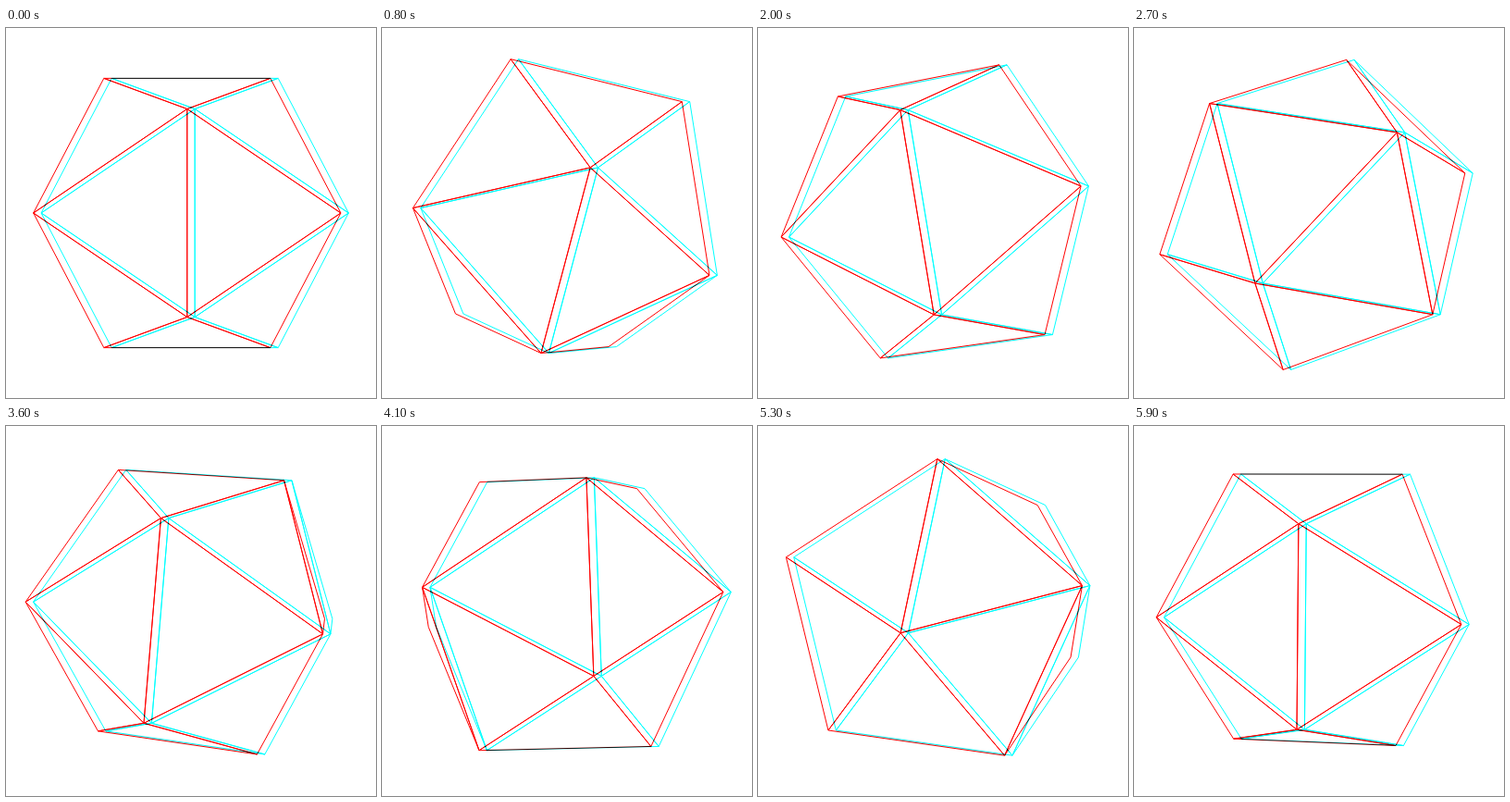
Write an HTML page with a canvas that moves like this. It is 400x400 px and loops after 6000 ms.

```html
<!DOCTYPE html>
<html lang="en">
<head>
<meta charset="utf-8">
<title>Anaglyph icosahedron</title>
<style>
  html, body { margin: 0; width: 100%; height: 100%; overflow: hidden; background: #fff; }
  canvas { display: block; }
</style>
</head>
<body>
<canvas id="stage" width="400" height="400"></canvas>
<script>
const ctx = document.getElementById('stage').getContext('2d');
const PHI = (1 + Math.sqrt(5)) / 2;
const UNIT = 90;            // pixels per unit at depth 0
const DISTANCE = 5 * PHI;   // from eye to centre
const PARALLAX = 4.2;
const LOOP = 6000, STEP = 100;

const dot = (a, b) => a[0] * b[0] + a[1] * b[1] + a[2] * b[2];
const cross = (a, b) => [
  a[1] * b[2] - a[2] * b[1],
  a[2] * b[0] - a[0] * b[2],
  a[0] * b[1] - a[1] * b[0]
];

const vertices = [];
for (const s of [-1, 1]) {
  for (const p of [-PHI, PHI]) vertices.push([0, s, p], [s, p, 0], [p, 0, s]);
}

// Faces are triples of neighbours, wound counter-clockwise seen from outside.
const adjacent = (i, j) => Math.abs(dot(vertices[i], vertices[j]) - PHI) < 1e-6;
const faces = [];
for (let i = 0; i < 12; i++) {
  for (let j = i + 1; j < 12; j++) {
    for (let k = j + 1; k < 12; k++) {
      if (!adjacent(i, j) || !adjacent(j, k) || !adjacent(i, k)) continue;
      const outward = dot(vertices[i], cross(vertices[j], vertices[k])) > 0;
      faces.push(outward ? [i, j, k] : [i, k, j]);
    }
  }
}

function pitch([x, y, z], angle) {
  const c = Math.cos(angle), s = Math.sin(angle);
  return [x, y * c + z * s, z * c - y * s];
}

function yaw([x, y, z], angle) {
  const c = Math.cos(angle), s = Math.sin(angle);
  return [x * c + z * s, y, z * c - x * s];
}

function project([x, y, z]) {
  const scale = UNIT * DISTANCE / (DISTANCE - z);
  return [200 + x * scale, 200 - y * scale];
}

const facesViewer = ([a, b, c]) =>
  (b[0] - a[0]) * (c[1] - a[1]) - (b[1] - a[1]) * (c[0] - a[0]) < 0;

function drawEye(triangles, color, shift) {
  ctx.strokeStyle = color;
  for (const triangle of triangles) {
    ctx.beginPath();
    for (const [x, y] of triangle) ctx.lineTo(x + shift, y);
    ctx.closePath();
    ctx.stroke();
  }
}

function draw() {
  const time = Math.floor(performance.now() % LOOP / STEP) * STEP;
  const angle = 2 * Math.PI * time / LOOP;
  const points = vertices.map(v => project(pitch(yaw(pitch(v, -angle), angle), 2 * angle)));
  const visible = faces.map(face => face.map(i => points[i])).filter(facesViewer);

  ctx.globalCompositeOperation = 'source-over';
  ctx.fillStyle = '#fff';
  ctx.fillRect(0, 0, 400, 400);
  ctx.globalCompositeOperation = 'multiply';
  ctx.lineWidth = 1;
  ctx.lineJoin = 'round';
  drawEye(visible, '#f00', -PARALLAX);
  drawEye(visible, '#0ff', PARALLAX);
  requestAnimationFrame(draw);
}
draw();
</script>
</body>
</html>
```
